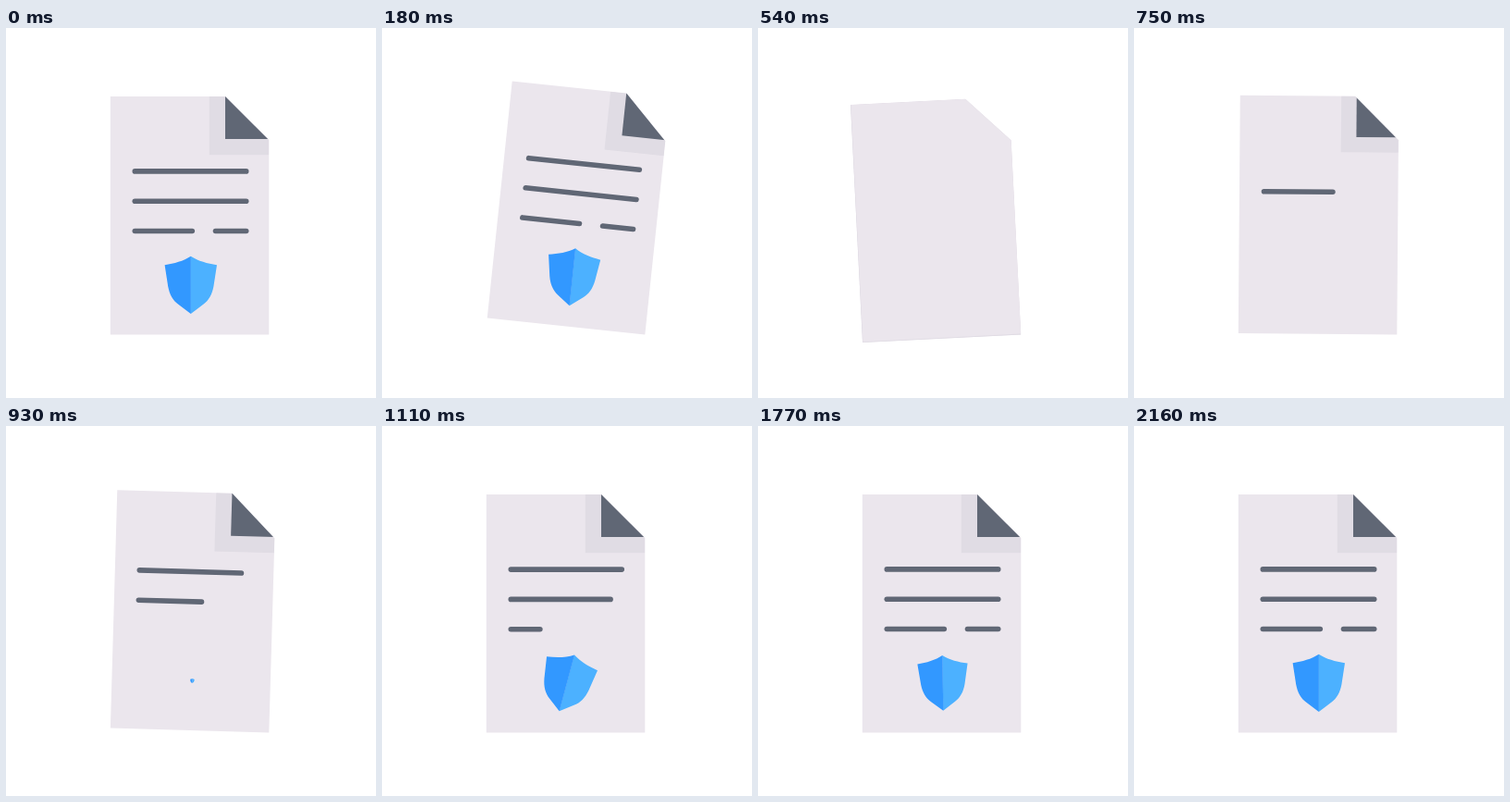
Recreate the animation shown at these times as an HTML page with a canvas. Size 400x400 px, loop 2400 ms.

```html
<!DOCTYPE html>
<html lang="en">
<head>
<meta charset="utf-8">
<title>Protected document</title>
<style>
  html, body { margin: 0; width: 100%; height: 100%; overflow: hidden; background: #fff; }
  canvas { display: block; width: 100vmin; height: 100vmin; margin: 0 auto; }
</style>
</head>
<body>
<canvas id="stage"></canvas>
<script>
const SIZE = 400, LOOP = 2400, STEP = 30, LAST = 2160;
const PAGE = [235, 230, 237], DARK = [96, 103, 117];
const SHADE = '#e0dce4', LEFT_BLUE = '#3298ff', RIGHT_BLUE = '#4cb1ff';
const L = 112.8, T = 74, R = 284.3, B = 331.4;
const CUT = 47.3, FOLD_H = 46, BAND = 17.2;
const SWAP = 577;

// x start, x end, y, time at which the line starts to grow
const LINES = [
  [139.3, 259.7, 154.9, 577],
  [139.3, 259.7, 187.2, 777],
  [139.3, 201.3, 219.5, 977],
  [226.5, 259.7, 219.5, 1177]
];
const GROW = 630, RISE = 60;

// time, value
const TILT = [[0, 0], [245, 6.5], [555, -2.9], [885, 1.7], [1120, 0]];
const SCALE = [[880, 0], [1200, 1.25], [1480, 0.73], [1860, 1]];
const TURN = [[880, 0], [1180, 17.5], [1500, -6], [1860, 0]];

const canvas = document.getElementById('stage');
const ctx = canvas.getContext('2d');

const clamp = v => Math.min(1, Math.max(0, v));
const span = (t, a, b) => clamp((t - a) / (b - a));
const mix = (a, b, u) => a + (b - a) * u;
const rad = deg => deg * Math.PI / 180;
const easeOut = u => 1 - (1 - u) ** 3;
const easeBoth = u => u < 0.5 ? 4 * u ** 3 : 1 - 4 * (1 - u) ** 3;
const smooth = u => u * u * (3 - 2 * u);
const rgb = c => `rgb(${c.map(Math.round).join(',')})`;
const blend = (a, b, u) => rgb(a.map((v, i) => mix(v, b[i], u)));

function track(keys, t, ease) {
  for (let i = 1; i < keys.length; i++) {
    const [t0, v0] = keys[i - 1], [t1, v1] = keys[i];
    if (t < t1) return mix(v0, v1, ease(span(t, t0, t1)));
  }
  return keys[keys.length - 1][1];
}

function pagePath() {
  ctx.beginPath();
  ctx.moveTo(L, T);
  ctx.lineTo(R - CUT, T);
  ctx.lineTo(R, T + CUT);
  ctx.lineTo(R, B);
  ctx.lineTo(L, B);
  ctx.closePath();
}

// Rectangle hanging from the top right corner, with its shade
function flap(w, h, band, color) {
  ctx.fillStyle = SHADE;
  ctx.fillRect(R - w - band, T, w + band, h + band);
  ctx.fillStyle = color;
  ctx.fillRect(R - w, T, w, h);
}

function drawLines(t) {
  const fresh = t >= SWAP;
  const dy = fresh ? RISE * (1 - easeOut(span(t, SWAP, SWAP + GROW))) : 0;
  ctx.strokeStyle = rgb(DARK);
  ctx.lineWidth = 5.6;
  ctx.lineCap = 'round';
  for (const [x0, x1, y, start] of LINES) {
    const u = fresh ? easeOut(span(t, start, start + GROW)) : 1;
    if (u <= 0) continue;
    ctx.beginPath();
    ctx.moveTo(x0, y + dy);
    ctx.lineTo(mix(x0, x1, u), y + dy);
    ctx.stroke();
  }
}

function halfShield(side, color) {
  ctx.save();
  ctx.scale(side, 1);
  ctx.beginPath();
  ctx.moveTo(0, -31.3);
  ctx.bezierCurveTo(8, -26, 18, -23.5, 28.2, -21.8);
  ctx.lineTo(24.6, 1.5);
  ctx.bezierCurveTo(23, 10, 19.5, 16.5, 13.5, 20.8);
  ctx.lineTo(0, 31);
  ctx.closePath();
  ctx.fillStyle = color;
  ctx.fill();
  ctx.restore();
}

function drawShield(t) {
  const fresh = t >= SWAP;
  const s = fresh ? track(SCALE, t, smooth) : 1;
  if (s <= 0) return;
  ctx.save();
  ctx.translate(199.8, 278);
  ctx.rotate(fresh ? rad(track(TURN, t, smooth)) : 0);
  ctx.scale(s, s);
  halfShield(1, RIGHT_BLUE);
  ctx.fillStyle = LEFT_BLUE;
  ctx.fillRect(-0.2, -30.8, 0.4, 61);
  halfShield(-1, LEFT_BLUE);
  ctx.restore();
}

function drawFold(t) {
  if (t < SWAP) {
    // the corner opens into the next sheet
    const u = easeBoth(span(t, 205, SWAP));
    flap(mix(CUT, R - L, u), mix(FOLD_H, B - T, u), BAND,
      blend(DARK, PAGE, span(t, 205, 340)));
  } else {
    const u = easeOut(span(t, 555, 848));
    flap(CUT * u, FOLD_H * u, BAND * u, rgb(DARK));
  }
}

function draw(t) {
  const k = canvas.width / SIZE;
  ctx.setTransform(k, 0, 0, k, 0, 0);
  ctx.fillStyle = '#fff';
  ctx.fillRect(0, 0, SIZE, SIZE);
  ctx.save();
  ctx.translate(R, B);
  ctx.rotate(rad(track(TILT, t, easeBoth)));
  ctx.translate(-R, -B);
  pagePath();
  ctx.fillStyle = rgb(PAGE);
  ctx.fill();
  ctx.clip();
  if (t < SWAP) {
    drawLines(t);
    drawShield(t);
    drawFold(t);
  } else {
    drawFold(t);
    drawLines(t);
    drawShield(t);
  }
  ctx.restore();
}

function fit() {
  const side = Math.min(innerWidth, innerHeight) || SIZE;
  canvas.width = canvas.height = Math.round(side * (devicePixelRatio || 1));
}

const begin = performance.now();
function frame() {
  const t = Math.max(0, performance.now() - begin) % LOOP;
  draw(Math.min(LAST, Math.floor(t / STEP) * STEP));
  requestAnimationFrame(frame);
}

addEventListener('resize', fit);
fit();
frame();
</script>
</body>
</html>
```
